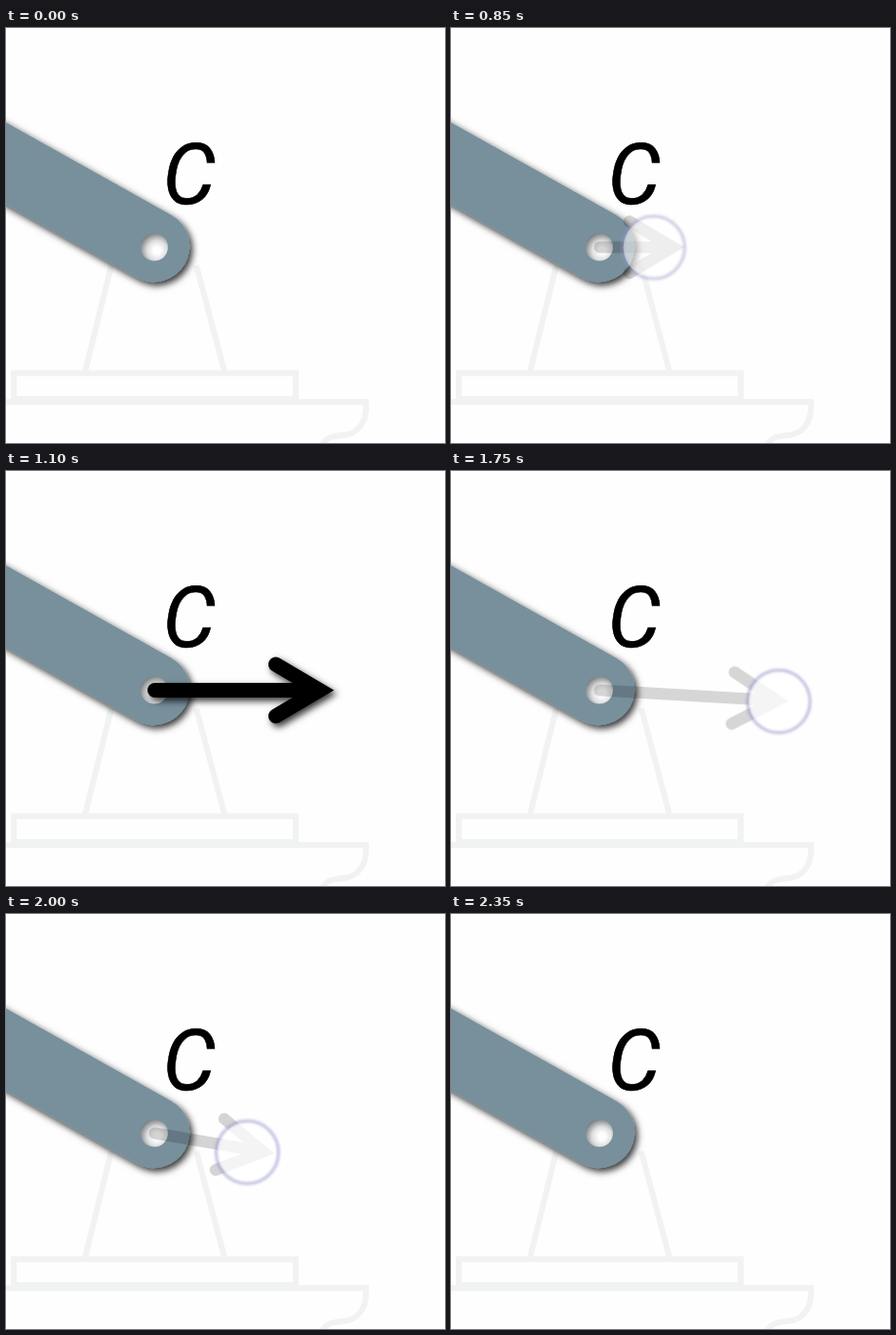
An HTML page that plays this animation: 450 by 425 pixels, repeating every 2400 ms.

```html
<!DOCTYPE html>
<html lang="en">
<head>
<meta charset="utf-8">
<title>Force arrow at C</title>
<style>
  html, body { margin: 0; width: 100%; height: 100%; overflow: hidden; background: #fefefe; }
  svg { display: block; }
  text { font: italic 86px Roboto, sans-serif; }
</style>
</head>
<body>
<svg width="450" height="425" viewBox="0 0 450 425" fill="none">
  <defs>
    <radialGradient id="holeFill" cx=".6" cy=".62" r=".66">
      <stop offset=".2" stop-color="#fefefe"/>
      <stop offset=".55" stop-color="#dedede"/>
      <stop offset="1" stop-color="#777b7d"/>
    </radialGradient>
    <filter id="shadow" filterUnits="userSpaceOnUse" x="-250" y="-50" width="750" height="500">
      <feDropShadow dx="3" dy="3.5" stdDeviation="3.7" flood-color="#000" flood-opacity=".8"/>
    </filter>
    <filter id="soft" x="-20%" y="-20%" width="140%" height="140%">
      <feGaussianBlur stdDeviation="1"/>
    </filter>
  </defs>

  <g stroke="#f1f3f2" stroke-width="6">
    <path d="M108 243 81 352M195 243 224 352"/>
    <path d="M8 353.500H297V380H8Z"/>
    <path d="M0 383H369V389C369 405 359 416 346 417C333 418 326 420 323 430"/>
  </g>
  <path d="M-200 27 151.500 223.500" stroke="#77909c" stroke-width="73.500" stroke-linecap="round" filter="url(#shadow)"/>
  <circle cx="152" cy="224.500" r="14" fill="url(#holeFill)"/>
  <text x="160.500" y="179.500" fill="#000" stroke="#000" stroke-width=".5">C</text>

  <g id="arrow" stroke="#000" stroke-linecap="round">
    <path id="shaft"/>
    <path id="head" d="M-60-26.500-15 0-60 26.500" stroke-miterlimit="8"/>
  </g>
  <g id="handle">
    <circle r="31" fill="#fff" fill-opacity=".75"/>
    <circle r="32" stroke="#9696cd" stroke-opacity=".5" stroke-width="3.500" filter="url(#soft)"/>
  </g>
</svg>
<script>
const LOOP = 2400, STEP = 50;
const PIVOT = { x: 152.5, y: 224.5 };
const FULL_TIP = { x: 336.4, y: 224.5 };
const [arrow, shaft, head, handle] =
  ['arrow', 'shaft', 'head', 'handle'].map(id => document.getElementById(id));

const clamp = value => Math.min(1, Math.max(0, value));
const mix = (a, b, amount) => a + (b - a) * amount;

function drawArrow(tip, solid) {
  const dx = tip.x - PIVOT.x, dy = tip.y - PIVOT.y;
  const length = Math.hypot(dx, dy);
  const angle = Math.atan2(dy, dx) * 180 / Math.PI;
  arrow.setAttribute('transform', `translate(${PIVOT.x} ${PIVOT.y}) rotate(${angle})`);
  arrow.setAttribute('stroke-width', solid ? 15 : 12);
  arrow.setAttribute('opacity', solid ? 1 : 0.16);
  arrow.setAttribute('filter', solid ? 'url(#shadow)' : 'none');
  shaft.setAttribute('d', `M0 0H${Math.max(0, length - 20)}`);
  head.setAttribute('transform', `translate(${length} 0)`);
}

function drawHandle(x, y, opacity) {
  handle.setAttribute('transform', `translate(${x} ${y})`);
  handle.setAttribute('opacity', opacity);
}

// The handle fades while the arrow grows and snaps to its full length.
function pullOut(time) {
  const progress = (time - 750) / 250;
  drawArrow({ x: mix(180, FULL_TIP.x, clamp(progress)), y: FULL_TIP.y }, false);
  drawHandle(mix(164, 273, progress), mix(226, 223, progress), 1 - progress / 2);
}

// The handle eases back along a sagging path with the tip just ahead of it.
function pushBack(time) {
  const eased = 1 - (1 - clamp((time - 1850) / 450)) ** 1.7;
  const sag = Math.sin(Math.PI * eased);
  const x = mix(336, 158, eased), y = mix(236, 226, eased) + 13 * sag;
  drawArrow({ x: x + 13 + 18 * sag, y: y + 2 * sag }, false);
  drawHandle(x, y, 1);
}

function render(now) {
  const time = Math.floor(now % LOOP / STEP) * STEP;
  const visible = time >= 750 && time < 2350;
  const solid = time >= 1100 && time < 1750;
  arrow.style.display = visible ? '' : 'none';
  handle.style.display = visible && !solid ? '' : 'none';

  if (solid) drawArrow(FULL_TIP, true);
  else if (time < 1100) pullOut(time);
  else pushBack(time);
}

const start = performance.now();
function tick() {
  render(performance.now() - start);
  requestAnimationFrame(tick);
}
tick();
</script>
</body>
</html>
```
